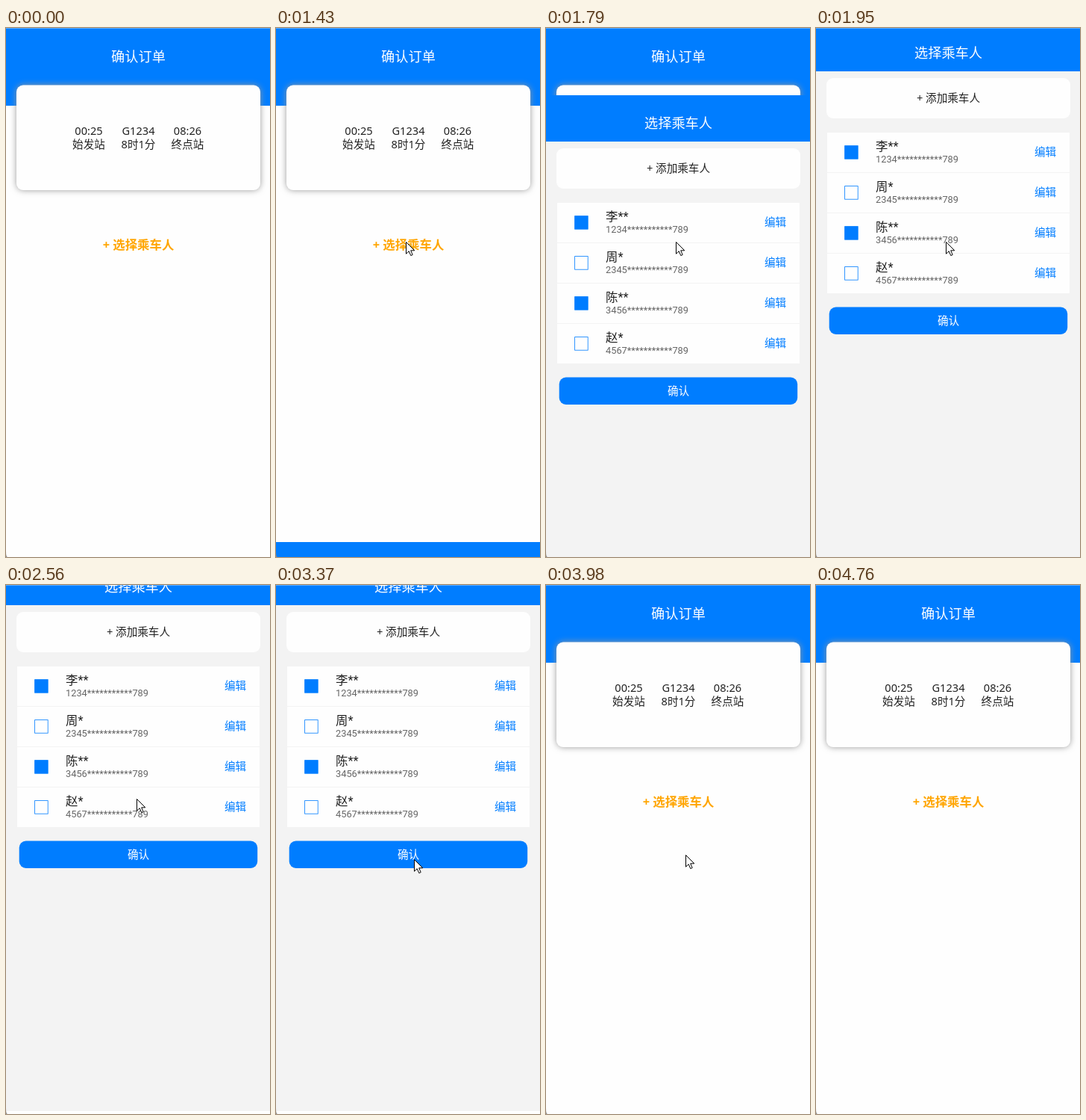
An HTML page for the animation above (5710 ms loop, 354 px wide and 708 px high).

```html
<!DOCTYPE html>
<html lang="zh-CN">
<head>
<meta charset="utf-8">
<title>确认订单</title>
<style>
  html, body { margin: 0; height: 100%; overflow: hidden; background: #fefefe; }
  svg { display: block; width: 100%; height: 100%; }
  text { font: 14.6px "Noto Sans", "Noto Sans CJK SC", "Noto Sans CJK", sans-serif; fill: #222; }
  .mid { text-anchor: middle; }
  .title { font-size: 18.2px; fill: #fff; }
  .pick { font-size: 16.4px; font-weight: 700; fill: #ffa500; }
  .name, .id { font-family: Roboto, "Noto Sans CJK SC", "Noto Sans CJK", sans-serif; }
  .name { font-size: 16.4px; }
  .id { font-size: 12.8px; fill: #666; }
  .edit { fill: #007dff; }
  .blue { fill: #007dff; }
  .white { fill: #fefefe; }
  .box { stroke: #007dff; stroke-width: .8; }
</style>
</head>
<body>
<svg viewBox="0 0 354 708">
  <defs>
    <filter id="shadow" x="-10%" y="-20%" width="120%" height="140%">
      <feDropShadow dx="0" dy="0" stdDeviation="4" flood-color="#999"/>
    </filter>
  </defs>

  <rect class="white" width="354" height="708"/>
  <rect class="blue" width="354" height="104"/>
  <text class="mid title" x="177.5" y="44.8">确认订单</text>
  <rect class="white" x="14" y="76.5" width="327" height="140.5" rx="9" filter="url(#shadow)"/>
  <g class="mid">
    <text x="111" y="143.2">00:25</text><text x="111" y="160.5">始发站</text>
    <text x="177.5" y="143.2">G1234</text><text x="177.5" y="160.5">8时1分</text>
    <text x="243.5" y="143.2">08:26</text><text x="243.5" y="160.5">终点站</text>
  </g>
  <text class="mid pick" x="177.5" y="296">+ 选择乘车人</text>

  <g id="sheet">
    <rect width="354" height="739" fill="#f3f3f3"/>
    <rect class="blue" width="354" height="62"/>
    <text class="mid title" x="177.5" y="44.4">选择乘车人</text>
    <rect class="white" x="14" y="71" width="327" height="54" rx="9"/>
    <text class="mid" x="177.5" y="103">+ 添加乘车人</text>
    <g id="list"></g>
    <rect class="blue" x="17.7" y="377.6" width="319.5" height="36.4" rx="9"/>
    <text class="mid" x="177.5" y="400.6" style="fill:#fff">确认</text>
  </g>

  <rect width="354" height="1" fill="#fff" opacity=".35"/>
  <path d="M0 700Q0 708 2 708H0Z" fill="#888"/>
  <path id="cursor" d="M.5 .5V16.2L4.2 12.7L6.8 18.6L9.2 17.5L6.7 11.8H11.8Z" fill="#fff" stroke="#000"/>
</svg>
<script>
const LOOP = 5710, STEP = 40;
const byId = id => document.getElementById(id);
const sheet = byId("sheet"), cursor = byId("cursor");

const riders = [["李**", "1234", true], ["周*", "2345", false], ["陈**", "3456", true], ["赵*", "4567", false]];
byId("list").innerHTML = riders.map(([name, head, on], i) => `
  <g transform="translate(0 ${144 + 54 * i})">
    <rect class="white" x="15" width="325" height="53"/>
    <rect class="box ${on ? "blue" : "white"}" x="38.6" y="17.6" width="17.6" height="17.6"/>
    <text class="name" x="80" y="24">${name}</text>
    <text class="id" x="80" y="40">${head}${"*".repeat(11)}789</text>
    <text class="edit" x="293" y="31">编辑</text>
  </g>`).join("");

const clamp = v => Math.min(1, Math.max(0, v));
const lerp = (a, b, k) => a + (b - a) * k;
const easeOut = k => 1 - (1 - k) ** 2;
const smooth = k => k * k * (3 - 2 * k);
const linear = k => k;

// cubic-bezier(.24, .08, .24, 1)
function ease(x) {
  const curve = (a, b, u) => 3 * a * u * (1 - u) ** 2 + 3 * b * u * u * (1 - u) + u ** 3;
  let lo = 0, hi = 1;
  for (let i = 0; i < 24; i++) {
    const u = (lo + hi) / 2;
    if (curve(.24, .24, u) < x) lo = u; else hi = u;
  }
  return curve(.08, 1, hi);
}

// The picture advances in steps counted from the first visible change.
const stepped = (t, first) => first + Math.floor((t - first) / STEP) * STEP;

function sheetTop(t) {
  if (t < 1430) return 708;
  if (t < 3820) return lerp(708, -35, ease(clamp((stepped(t, 1430) - 1396) / 745)));
  return lerp(-35, 708, ease(clamp((stepped(t, 3820) - 3785) / 195)));
}

// start, end, from x, y, to x, y, easing
const moves = [
  [250, 810, 8, 603, 173, 290, easeOut],
  [850, 850, 174, 286, 174, 286, linear],
  [2560, 3120, 175, 286, 184, 369, smooth],
  [3370, 3490, 185, 367, 187, 361, easeOut],
  [4270, 4310, 187, 362, 186, 363, linear],
  [4680, 4720, 110, 412, 25, 483, linear]
];

function cursorAt(t) {
  if (t < 250 || t >= 4760) return null;
  const [start, end, x0, y0, x1, y1, fn] = moves.filter(m => m[0] <= t).pop();
  const k = fn(clamp((stepped(t, start) - start) / (end - start || 1)));
  return [lerp(x0, x1, k), lerp(y0, y1, k)].map(Math.round);
}

const moveTo = (el, x, y) => el.setAttribute("transform", `translate(${x} ${y})`);

function draw(t) {
  moveTo(sheet, 0, Math.round(sheetTop(t) * 2) / 2);
  const tip = cursorAt(t);
  cursor.setAttribute("visibility", tip ? "visible" : "hidden");
  if (tip) moveTo(cursor, ...tip);
}

const begin = performance.now();
function tick() {
  draw((performance.now() - begin) % LOOP);
  requestAnimationFrame(tick);
}
tick();
</script>
</body>
</html>
```
